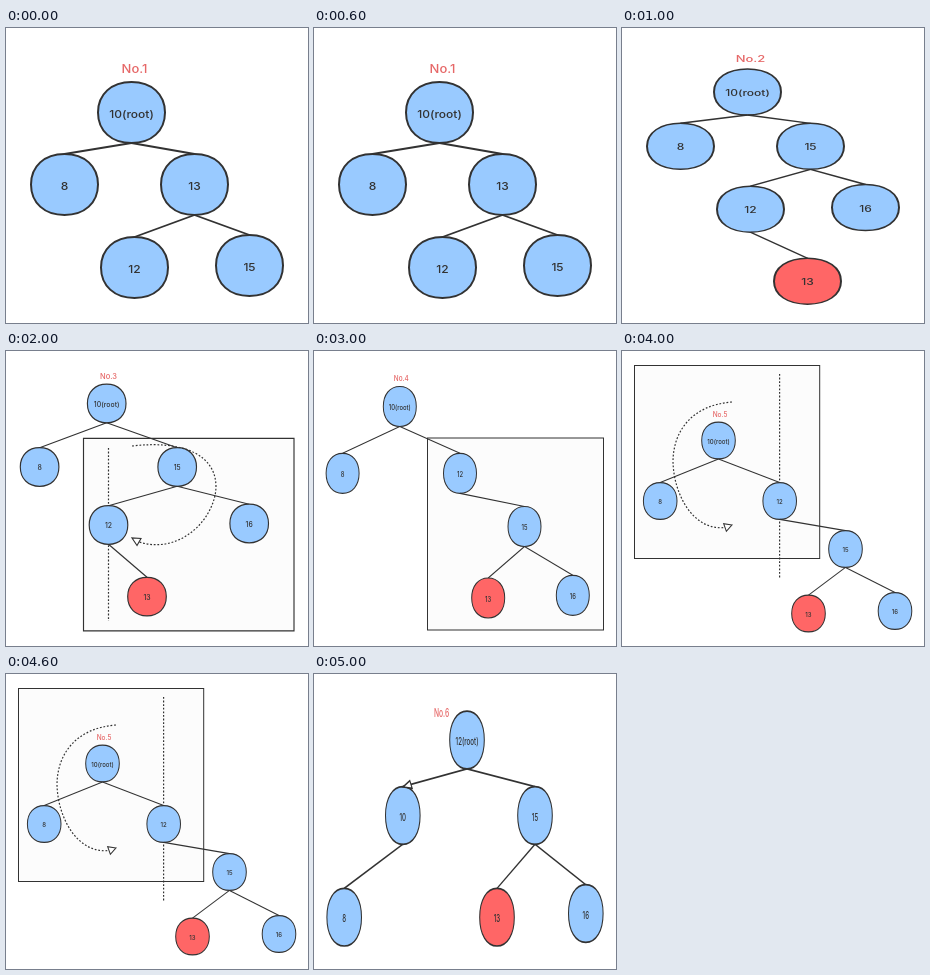
An HTML page with a canvas for the animation above (6 s loop, 302 px wide and 295 px high).

```html
<!DOCTYPE html>
<html lang="en">
<head>
<meta charset="utf-8">
<title>Tree rotation</title>
<style>
  html, body { margin: 0; width: 100%; height: 100%; overflow: hidden; background: #fff; }
  canvas { display: block; width: 302px; height: 295px; }
</style>
</head>
<body>
<canvas id="stage"></canvas>
<script>
const W = 302, H = 295, STEP = 1000;
const INK = '#323232', BLUE = '#99caff', RED = '#ff6666', TITLE = '#e66868';
const BASE_R = 33.5; // node radius at scale 1

const canvas = document.getElementById('stage');
const ctx = canvas.getContext('2d');
const dpr = window.devicePixelRatio || 1;
canvas.width = W * dpr;
canvas.height = H * dpr;

let rx, ry, nodes;

function size(a, b) {
  rx = a;
  ry = b;
  nodes = {};
}

// The pen and the lettering share the scale of the nodes.
function scaled(x, y, paint) {
  ctx.save();
  ctx.translate(x, y);
  ctx.scale(rx / BASE_R, ry / BASE_R);
  paint();
  ctx.restore();
}

function stroke(width = 2) {
  scaled(0, 0, () => {
    ctx.lineWidth = width;
    ctx.strokeStyle = INK;
    ctx.stroke();
  });
}

function text(str, x, y, px, color) {
  scaled(x, y, () => {
    ctx.font = `500 ${px}px Inter, "Liberation Sans", sans-serif`;
    ctx.textAlign = 'center';
    ctx.fillStyle = color;
    ctx.fillText(str, 0, px * 0.364);
  });
}

function title(str, x, y) {
  text(str, x, y, 13, TITLE);
}

function line(x1, y1, x2, y2) {
  ctx.beginPath();
  ctx.moveTo(x1, y1);
  ctx.lineTo(x2, y2);
  stroke();
}

// Slightly squarish ellipse.
function oval(x, y) {
  const k = 0.6, kx = rx * k, ky = ry * k;
  ctx.beginPath();
  ctx.moveTo(x, y - ry);
  ctx.bezierCurveTo(x + kx, y - ry, x + rx, y - ky, x + rx, y);
  ctx.bezierCurveTo(x + rx, y + ky, x + kx, y + ry, x, y + ry);
  ctx.bezierCurveTo(x - kx, y + ry, x - rx, y + ky, x - rx, y);
  ctx.bezierCurveTo(x - rx, y - ky, x - kx, y - ry, x, y - ry);
  ctx.closePath();
}

function node(label, x, y, parent, fill = BLUE) {
  const p = nodes[parent];
  if (p) line(p.x, p.y + ry, x, y - ry);
  nodes[label] = { x, y };
  oval(x, y);
  ctx.fillStyle = fill;
  ctx.fill();
  stroke();
  text(label, x, y + 1.5 * ry / BASE_R, 12, INK);
}

function panel(x, y, right, bottom) {
  ctx.beginPath();
  ctx.rect(x, y, right - x, bottom - y);
  ctx.fillStyle = '#fcfcfc';
  ctx.fill();
  stroke();
}

function dotted(path) {
  ctx.save();
  ctx.setLineDash([1.8, 1.8]);
  ctx.lineWidth = 1.2;
  ctx.strokeStyle = INK;
  ctx.stroke(new Path2D(path));
  ctx.restore();
}

function arrow(tipX, tipY, baseX, baseY) {
  const dx = baseX - tipX, dy = baseY - tipY;
  const k = 4 / Math.hypot(dx, dy);
  ctx.beginPath();
  ctx.moveTo(tipX, tipY);
  ctx.lineTo(baseX - dy * k, baseY + dx * k);
  ctx.lineTo(baseX + dy * k, baseY - dx * k);
  ctx.closePath();
  ctx.fillStyle = '#fff';
  ctx.fill();
  stroke();
}

const scenes = [
  function start() {
    size(33.5, 30.5);
    title('No.1', 128.5, 40.8);
    node('10(root)', 125.5, 84.5);
    node('8', 58.5, 156.5, '10(root)');
    node('13', 188.5, 156.5, '10(root)');
    node('12', 128.5, 239.5, '13');
    node('15', 243.5, 237.5, '13');
  },
  function unbalanced() {
    size(33.5, 23);
    title('No.2', 128.5, 30.8);
    node('10(root)', 125.5, 64);
    node('8', 58.5, 118.3, '10(root)');
    node('15', 188.5, 118.3, '10(root)');
    node('12', 128.5, 181.2, '15');
    node('16', 243.5, 179.5, '15');
    node('13', 185.5, 253.2, '12', RED);
  },
  function turnRight() {
    size(19.3, 19.3);
    panel(77.5, 87.3, 288, 279.8);
    dotted('M102.5 97V270');
    title('No.3', 102.5, 25.5);
    node('10(root)', 100.7, 52.5);
    node('8', 33.6, 116, '10(root)');
    node('15', 171.2, 116, '10(root)');
    node('12', 102.5, 174, '15');
    node('16', 243.2, 172.5, '15');
    node('13', 141, 245.6, '12', RED);
    dotted('M126 95C178 89 210 104 210 136C209 168 174 204 133 191');
    arrow(126, 187, 133, 191);
  },
  function turned() {
    size(16.5, 20);
    panel(113.5, 87, 289.5, 279);
    title('No.4', 87.3, 27);
    node('10(root)', 85.8, 55.5);
    node('8', 28.6, 122.3, '10(root)');
    node('12', 146, 122.3, '10(root)');
    node('15', 210.5, 175.5, '12');
    node('13', 174.2, 247, '15', RED);
    node('16', 258.8, 244.3, '15');
  },
  function turnLeft() {
    size(16.8, 18.4);
    panel(12.5, 14.5, 197.7, 207.5);
    dotted('M157.6 23V227');
    title('No.5', 98, 63.5);
    node('10(root)', 96.5, 89.5);
    node('8', 38.2, 150, '10(root)');
    node('12', 157.7, 150, '10(root)');
    node('15', 223.5, 198, '12');
    node('13', 186.5, 262.5, '15', RED);
    node('16', 273, 260, '15');
    dotted('M110 51C70 54 51 80 51 111C52 145 72 180 103 176.5');
    arrow(110, 174, 103, 176.5);
  },
  function balanced() {
    size(17.3, 28.8);
    title('No.6', 127.5, 38.5);
    node('12(root)', 153, 66);
    node('10', 88.8, 141.5, '12(root)');
    node('15', 221, 141.5, '12(root)');
    node('8', 30.2, 243.2, '10');
    node('13', 183, 243.2, '15', RED);
    node('16', 271.8, 239.5, '15');
    arrow(89, 113, 97, 110.5);
  }
];

const t0 = performance.now();

function frame(now) {
  const i = Math.floor(Math.max(0, now - t0) / STEP) % scenes.length;
  ctx.setTransform(dpr, 0, 0, dpr, 0, 0);
  ctx.fillStyle = '#fff';
  ctx.fillRect(0, 0, W, H);
  scenes[i]();
  requestAnimationFrame(frame);
}
frame(t0);
</script>
</body>
</html>
```
